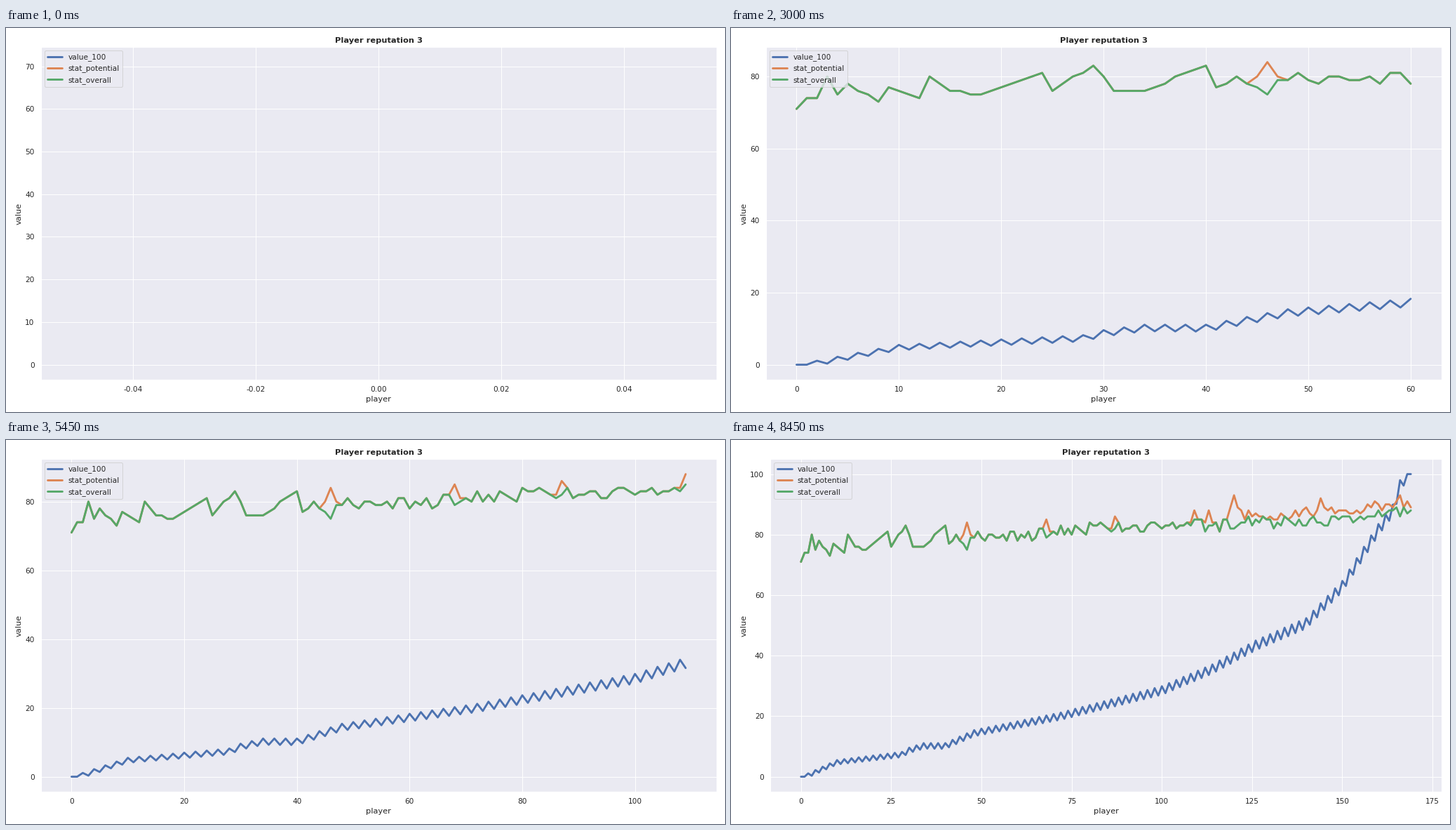
A matplotlib script that plays this animation: 1025x547 px, repeating every 8500 ms.

```python
import matplotlib.pyplot as plt
import numpy as np
from matplotlib.animation import FuncAnimation

COUNT = 170
INTERVAL = 50
WIDTH, HEIGHT = 1025, 547
DPI = HEIGHT / 8
INK = "#262626"
PANEL = "#eaeaf2"
# Layout area: one pixel off the left and top, a little off the bottom.
AREA = (1 / WIDTH, 0.7 / HEIGHT, 1, 1 - 1 / HEIGHT)

plt.rcParams.update({
    "font.family": "DejaVu Sans", "font.size": 12, "text.color": INK,
    "axes.facecolor": PANEL, "axes.edgecolor": "white", "axes.linewidth": 1.25,
    "axes.labelcolor": INK, "axes.labelsize": 12, "axes.titlesize": 12,
    "axes.axisbelow": True, "axes.grid": True, "axes.unicode_minus": False,
    "grid.color": "white", "grid.linewidth": 1, "grid.linestyle": "-",
    "xtick.color": INK, "ytick.color": INK,
    "xtick.labelsize": 11, "ytick.labelsize": 11,
    "xtick.major.size": 6, "ytick.major.size": 6,
    "xtick.bottom": False, "ytick.left": False,
    "lines.solid_capstyle": "round", "legend.fontsize": 11,
})

rng = np.random.default_rng(3)
player = np.arange(COUNT)


def through(*points):
    """Piecewise linear curve over all players."""
    return np.interp(player, *zip(*points))


def jitter(start):
    """Small random wobble from the given player on."""
    wobble = np.clip(rng.normal(0, 1.2, COUNT), -2, 2)
    return np.where(player >= start, wobble, 0)


# The value climbs along a curve; odd players fall below it by a growing gap.
crest = through((0, 0), (10, 5.5), (28, 8.2), (30, 9.6), (34, 11.1),
                (40, 11.1), (48, 15.4), (72, 21.2), (100, 29.9), (114, 37.1),
                (126, 45), (140, 52.4), (150, 64.7), (160, 83.5), (164, 89.9),
                (166, 98), (169, 104))
gap = (player % 2) * (1.3 + 0.015 * player)
value = np.clip(crest - gap, 0, 100)

# Overall rating: early turning points, then a wobbling rise.
overall = np.rint(jitter(48) + through(
    (0, 71), (1, 74), (2, 74), (3, 80), (4, 75), (5, 78), (8, 73), (9, 77),
    (12, 74), (13, 80), (15, 76), (18, 75), (24, 81), (25, 76), (29, 83),
    (31, 76), (34, 76), (40, 83), (41, 77), (43, 80), (46, 75), (47, 79),
    (87, 82.5), (139, 84), (169, 88)))

# Potential exceeds it around a few talents and among the top players.
talents = [(46, 84), (68, 85), (87, 86), (109, 88), (113, 88), (120, 93),
           (144, 92), (166, 93)]
potential = overall.copy()
for place, height in talents:
    potential = np.maximum(potential, height - 4 * abs(player - place))
elite = np.rint(through((122, 85.5), (169, 90)) + jitter(122))
potential = np.where(player >= 122, np.maximum(potential, elite), potential)

fig, ax = plt.subplots(figsize=((WIDTH + 0.001) / DPI, 8), dpi=DPI,
                       facecolor="white")
ax.set_title("Player reputation 3", weight="bold")
ax.set_xlabel("player")
ax.set_ylabel("value")

SERIES = [
    ("value_100", value, "#4c72b0"),
    ("stat_potential", potential, "#dd8452"),
    ("stat_overall", overall, "#55a868"),
]
lines = [ax.plot([], [], color=color, lw=3, label=label)[0]
         for label, _, color in SERIES]
ax.legend(loc="upper left")


def update(frame):
    shown = slice(frame + 1)
    for line, (_, data, _) in zip(lines, SERIES):
        line.set_data(player[shown], data[shown])
    ax.relim()
    ax.autoscale_view()
    fig.tight_layout(rect=AREA)
    return lines


anim = FuncAnimation(fig, update, frames=COUNT, interval=INTERVAL,
                     repeat=True, repeat_delay=0, blit=False)
plt.show()
```
